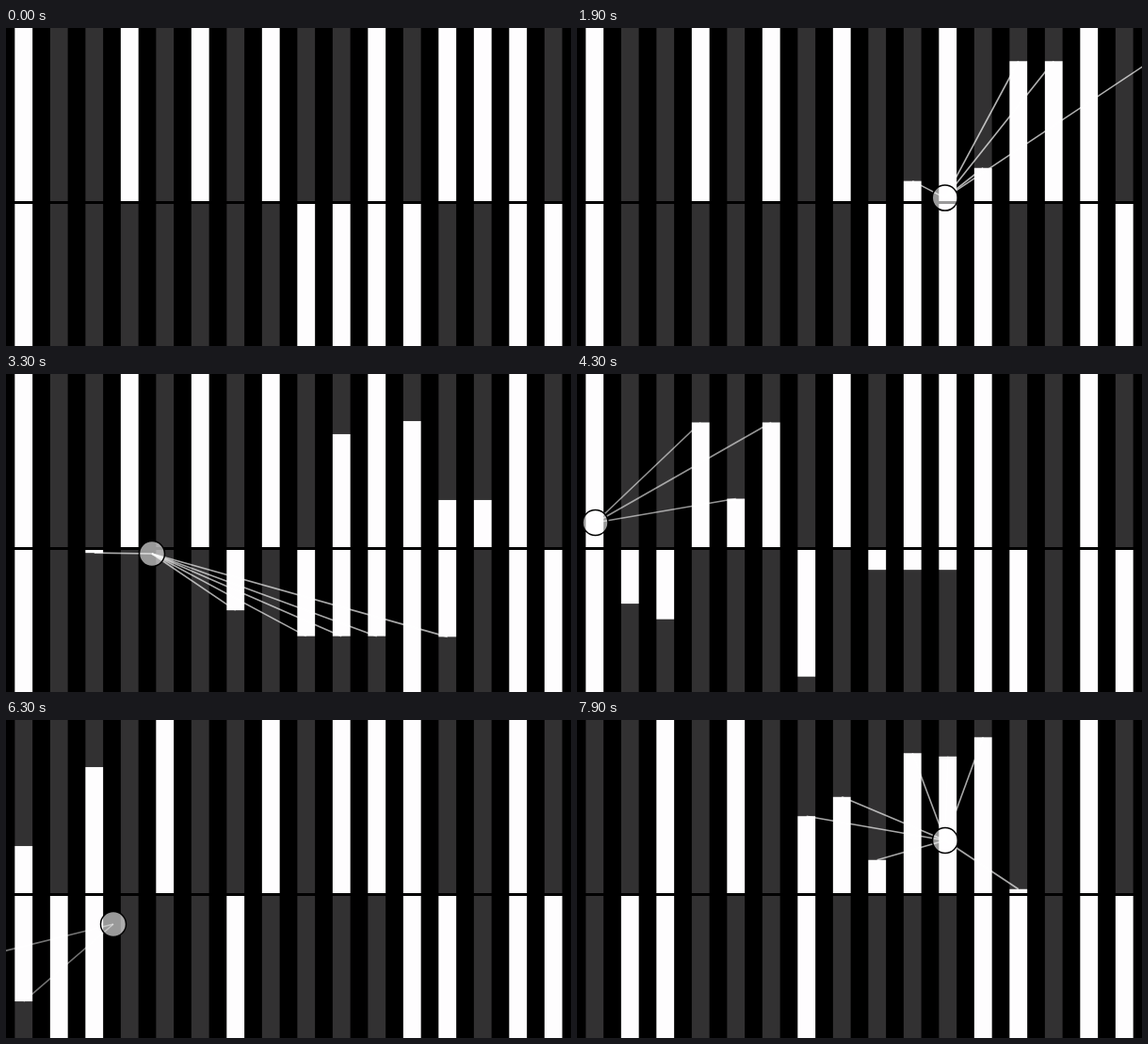
These frames come from a looping animation (600x338 px, 8 s). An HTML page with a canvas:

```html
<!DOCTYPE html>
<html lang="en">
<head>
<meta charset="utf-8">
<title>Bars and ball</title>
<style>
  html, body { margin: 0; width: 100%; height: 100%; overflow: hidden; background: #000; }
  canvas { display: block; width: 600px; height: 338px; }
</style>
</head>
<body>
<canvas id="stage" width="600" height="338"></canvas>
<script>
const ctx = document.getElementById('stage').getContext('2d');
const LOOP = 8000, STEP = 100;
const COLS = 16, PITCH = 37.5, BAR = 18.75;
const FULL = 184, MIDDLE = 185.5, RATE = 0.0705; // px, px, px per ms
const TOP = 0, BOTTOM = 1;

// Columns that are lit when the loop begins
const lit = [
  new Set([0, 3, 5, 7, 10, 12, 13, 14]),
  new Set([0, 8, 9, 10, 11, 14, 15])
];

// Start time, row, columns that flip
const flips = [
  [-300, TOP, [16]],
  [1400, TOP, [11, 12, 13]],
  [1597, TOP, [9]],
  [1990, BOTTOM, [8, 9, 10, 12]],
  [2390, BOTTOM, [6]],
  [3255, BOTTOM, [2]],
  [3490, BOTTOM, [1]],
  [3570, TOP, [3, 4, 5]],
  [4400, TOP, [0, 2]],
  [5280, BOTTOM, [-2, 0]],
  [6740, TOP, [6, 7]],
  [7350, TOP, [10]],
  [7400, TOP, [8, 9]],
  [7640, TOP, [11]],
  [7840, TOP, [12]]
];

// Ball path: time, x, y, opacity of its threads
const path = [
  [0, 682, 160, 0.82],
  [400, 614, 164, 0.82],
  [1200, 478, 167, 0.82],
  [1600, 426, 166, 0.75],
  [2000, 377, 185, 0.68],
  [2600, 275, 199, 0.64],
  [3300, 155, 191, 0.66],
  [3570, 113, 185.5, 0.65],
  [3900, 68, 173, 0.62],
  [4300, 19.5, 158, 0.58],
  [4900, -15, 163, 0.54],
  [5280, -5, 185.5, 0.5],
  [5800, 40, 214, 0.47],
  [6300, 114, 217, 0.45],
  [6740, 190, 185.5, 0.52],
  [7900, 391, 128, 0.66]
];

// Smooth curve through the path for one channel
function along(t, ch) {
  const last = path.length - 1;
  let i = 0;
  while (i < last - 1 && t > path[i + 1][0]) i++;
  const slope = k => {
    const a = path[Math.max(0, k - 1)], b = path[Math.min(last, k + 1)];
    return (b[ch] - a[ch]) / (b[0] - a[0]);
  };
  const a = path[i], b = path[i + 1], d = b[0] - a[0];
  const u = (t - a[0]) / d, v = 1 - u;
  return v * v * (1 + 2 * u) * a[ch] + u * u * (3 - 2 * u) * b[ch]
    + d * u * v * (v * slope(i) - u * slope(i + 1));
}

// Lit length of a bar, and whether it is changing
function barAt(row, col, t) {
  // A column may flip more than once, so apply the flips in order
  let on = lit[row].has(col), len = on ? FULL : 0, moving = false;
  for (const [start, r, cols] of flips) {
    if (r !== row || t <= start || !cols.includes(col)) continue;
    const grown = Math.min(FULL, (t - start) * RATE);
    on = !on;
    len = on ? grown : FULL - grown;
    moving = grown < FULL;
  }
  return { len, moving };
}

const center = col => PITCH * (col + 0.5);
const tip = (row, len) => row === TOP ? 184 - len : 187 + len;

function fillBar(row, col, len, color) {
  ctx.fillStyle = color;
  ctx.fillRect(center(col) - BAR / 2, row === TOP ? 184 - len : 187, BAR, len);
}

function draw(t) {
  ctx.fillStyle = '#000';
  ctx.fillRect(0, 0, 600, 338);

  const x = along(t, 1), y = along(t, 2);
  const side = y > MIDDLE ? BOTTOM : TOP;
  const threads = [];

  for (const row of [TOP, BOTTOM]) {
    for (let col = -2; col <= COLS; col++) {
      const { len, moving } = barAt(row, col, t);
      if (col >= 0 && col < COLS) {
        fillBar(row, col, FULL, '#323132');
        fillBar(row, col, len, '#fefdfe');
      }
      if (moving && row === side) threads.push([center(col), tip(row, len)]);
    }
  }

  ctx.strokeStyle = `rgba(255,255,255,${along(t, 3)})`;
  ctx.lineWidth = 1.6;
  for (const [tx, ty] of threads) {
    ctx.beginPath();
    ctx.moveTo(x, y);
    ctx.lineTo(tx, ty);
    ctx.stroke();
  }

  ctx.beginPath();
  ctx.arc(x, y, 13.5, 0, Math.PI * 2);
  ctx.fillStyle = 'rgba(255,255,255,0.6)';
  ctx.fill();
  ctx.strokeStyle = '#000';
  ctx.lineWidth = 1.5;
  ctx.stroke();
}

const begin = performance.now();
function tick() {
  const t = (performance.now() - begin) % LOOP;
  draw(Math.floor(t / STEP) * STEP);
  requestAnimationFrame(tick);
}
tick();
</script>
</body>
</html>
```
